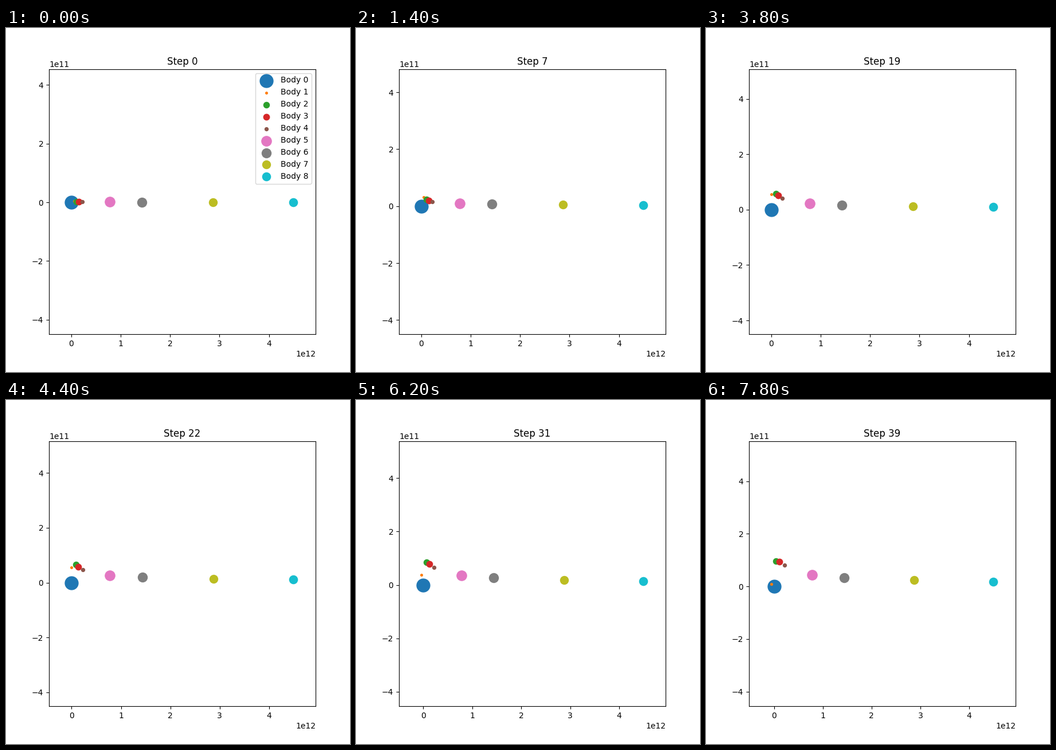
A matplotlib script that plays this animation: 600x600 px, repeating every 8 s.

```python
import numpy as np
import matplotlib.pyplot as plt
from matplotlib.animation import FuncAnimation

G = 6.674e-11
DAY = 86400
STEPS = 40

mass = np.array([1.989e30, 3.301e23, 4.867e24, 5.972e24, 6.417e23,
                 1.898e27, 5.683e26, 8.681e25, 1.024e26])
dist = np.array([0, 57.9, 108.2, 149.6, 227.9, 778.5, 1433.5, 2872.5, 4495.1]) * 1e9
speed = np.array([0, 47.87, 35.02, 29.78, 24.08, 13.07, 9.69, 6.81, 5.43]) * 1e3

colors = plt.cm.tab10(np.linspace(0, 1, len(mass)))
sizes = 7 + 39 * np.log10(mass / mass.min())


def accel(pos):
    gap = pos[None, :, :] - pos[:, None, :]
    r = np.linalg.norm(gap, axis=2)
    np.fill_diagonal(r, np.inf)
    return (G * mass[None, :, None] * gap / r[:, :, None] ** 3).sum(axis=1)


def simulate():
    """Semi-implicit Euler, one day per step."""
    pos = np.column_stack([dist, np.zeros_like(dist)])
    vel = np.column_stack([np.zeros_like(speed), speed])
    path = []
    for _ in range(STEPS):
        vel = vel + accel(pos) * DAY
        pos = pos + vel * DAY
        path.append(pos)
    return path


path = simulate()
fig, ax = plt.subplots(figsize=(6, 6), dpi=100)


def draw(step):
    ax.clear()
    pos = path[step]
    for i, (x, y) in enumerate(pos):
        ax.scatter(x, y, s=sizes[i], color=colors[i], label=f"Body {i}")
    low, high = pos.min(axis=0), pos.max(axis=0)
    pad = 0.1 * (high - low).max()
    ax.set_xlim(low[0] - pad, high[0] + pad)
    ax.set_ylim(low[1] - pad, high[1] + pad)
    ax.set_title(f"Step {step}")
    if step == 0:
        ax.legend(loc="upper right")
    return ax.collections


anim = FuncAnimation(fig, draw, frames=STEPS, interval=200,
                     init_func=lambda: draw(0), repeat=True, repeat_delay=0)
plt.show()
```
